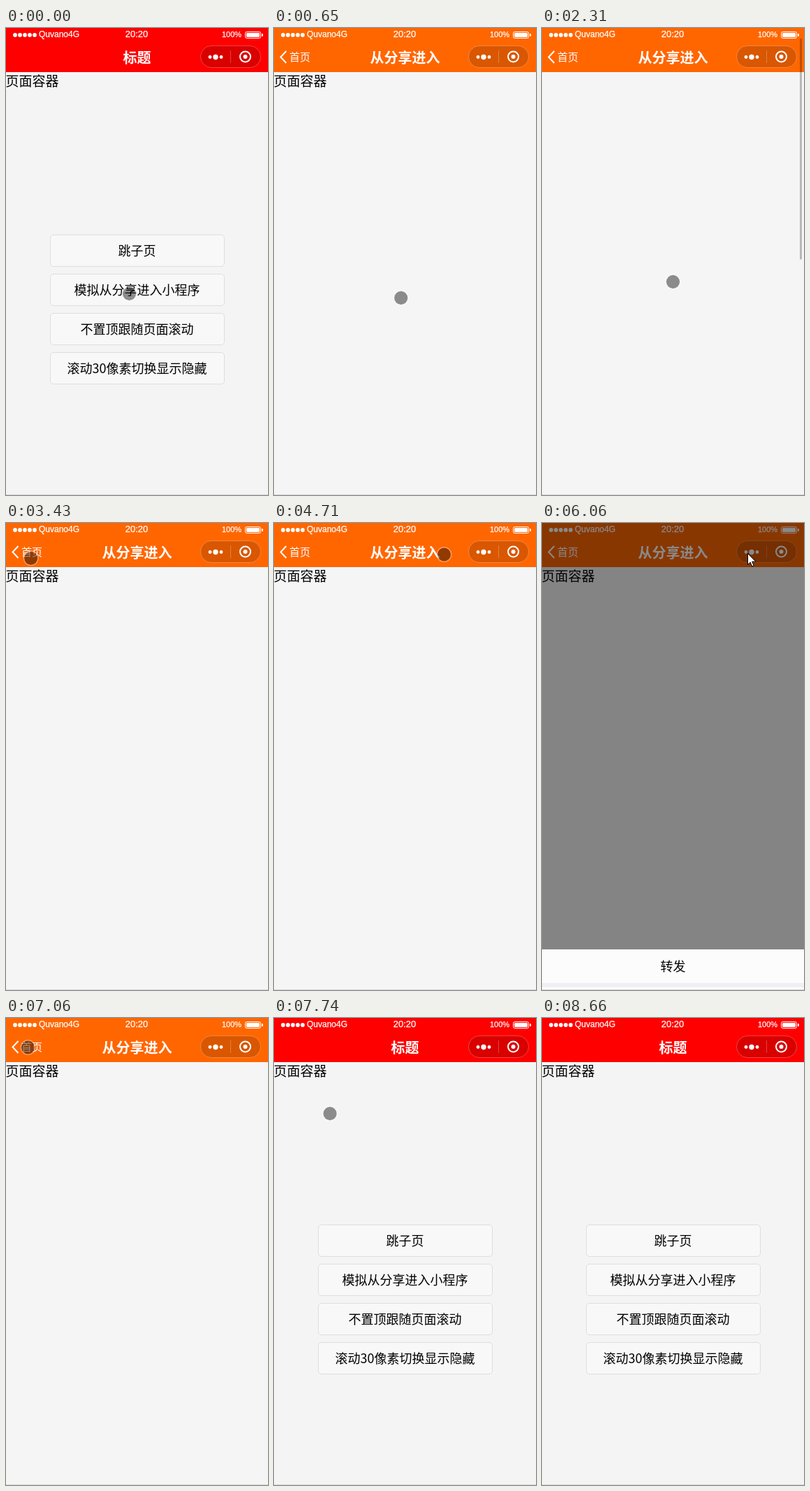
Write an HTML page that moves like this. It is 375 by 667 pixels and loops after 9710 ms.

```html
<!DOCTYPE html>
<html lang="zh-CN">
<head>
<meta charset="utf-8">
<title>导航栏演示</title>
<style>
  html, body { margin: 0; width: 100%; height: 100%; overflow: hidden; background: #f4f4f4; }
  svg { display: block; width: 375px; height: 667px; }
  text { font-family: "Noto Sans CJK SC", "Noto Sans CJK", sans-serif; font-size: 18px; font-weight: 350; }
  .mid { text-anchor: middle; }
  .title { font-size: 20px; font-weight: 700; fill: #fff; }
  .label { font-size: 19px; }
  .status text { font-family: "Liberation Sans", Arial, sans-serif; font-weight: 400; stroke: #fff; stroke-width: .25; }
  .button rect { fill: #f8f8f8; stroke: #dedede; }
</style>
</head>
<body>
<svg viewBox="0 0 375 667">
  <rect id="bg" width="375" height="667"/>
  <text id="label" class="label" x="-.5" y="83">页面容器</text>
  <g id="buttons"></g>

  <rect id="bar" width="375" height="63"/>
  <g class="status" fill="#fff">
    <path d="M13 10h28.1" stroke="#fff" stroke-width="5.8" stroke-linecap="round" stroke-dasharray="0 7"/>
    <text x="47" y="13" style="font-size:12px">Quvano4G</text>
    <text x="187" y="13" class="mid" style="font-size:13px">20:20</text>
    <text x="309" y="13" style="font-size:11px">100%</text>
    <rect x="342.5" y="5.5" width="22" height="9" rx="2" fill="none" stroke="#fff"/>
    <rect x="344" y="7" width="19" height="6" rx="1"/>
    <path d="M366 8h1q1 0 1 2t-1 2h-1z"/>
  </g>
  <text id="title" class="mid title" x="187.5" y="50"></text>
  <g id="home">
    <path d="M17.5 33L9.5 41.5L17.5 50" fill="none" stroke="#fff" stroke-width="2"/>
    <text x="22" y="47" fill="#fff" style="font-size:15px">首页</text>
  </g>
  <g fill="#fff">
    <rect x="278.5" y="25.5" width="86" height="31" rx="15.5" fill="#000" fill-opacity=".15" stroke="#fff" stroke-opacity=".25"/>
    <path d="M321.5 32v18" stroke="#fff" stroke-opacity=".25"/>
    <circle cx="292" cy="41.5" r="2.4"/>
    <circle cx="300" cy="41.5" r="3.7"/>
    <circle cx="308" cy="41.5" r="2.4"/>
    <circle cx="342.5" cy="41" r="7.5" fill="none" stroke="#fff" stroke-width="2"/>
    <circle cx="342.5" cy="41" r="3"/>
  </g>

  <rect id="thumb" x="369" width="3" height="316" rx="1.5" fill-opacity=".25"/>
  <rect id="mask" width="375" height="667"/>
  <g id="sheet">
    <rect y="566" width="375" height="102" fill="#efeff4"/>
    <rect y="566" width="375" height="48" fill="#fcfcfc"/>
    <rect y="620" width="375" height="48" fill="#fcfcfc"/>
    <text class="mid" x="187.5" y="597">转发</text>
    <text class="mid" x="187.5" y="651">取消</text>
  </g>
  <path d="M0 666.5h375" stroke="#dadada"/>

  <g id="touch">
    <circle r="9.7" fill-opacity=".43"/>
    <circle r="10.2" fill="none" stroke="#fff" stroke-opacity=".35" stroke-width="1.6"/>
  </g>
  <path id="arrow" d="M0 0V16L3.7 12.6L6.2 18.6L8.7 17.5L6.2 11.7H11.4Z" fill="#fff" stroke="#000"/>
</svg>
<script>
const LOOP = 9710;
const STEP = 134; // the screen updates in steps of this many ms
const SHARE_OPEN = 510, SHARE_CLOSE = 7740;
const SCROLL = 2310, SCROLL_BACK = 2440, THUMB_FADE = 2860;
const SHEET_OPEN = 5500, SHEET_CLOSE = 6060, SHEET_GONE = 6200;
const POINTER_GONE = 8660;

const el = id => document.getElementById(id);
const show = (id, on) => { el(id).style.display = on ? '' : 'none'; };
const place = (id, x, y) => el(id).setAttribute('transform', `translate(${x} ${y})`);

// Progress from 0 to 1 in equal steps, the first one taken at the start time.
const stepped = (t, start, steps) =>
  Math.min(steps, Math.max(0, Math.floor((t - start) / STEP) + 1)) / steps;

function pointerAt(t) {
  let x = 176.5, y = 379.5;
  const move = (start, steps, toX, toY) => {
    const k = stepped(t, start, steps);
    x += (toX - x) * k;
    y += (toY - y) * k;
  };
  move(250, 8, 190.5, 395.5);
  move(1750, 2, 187.5, 362.5);
  move(SCROLL_BACK, 3, 190, 397);
  move(THUMB_FADE, 4, 38, 52);
  move(3430, 3, 31, 47);
  move(4440, 3, 243.5, 45);
  move(4840, 2, 296, 55);
  move(5110, 3, 294.5, 43.5);
  move(SHEET_GONE, 5, 25, 54);
  move(7060, 1, 31.5, 42);
  move(7490, 8, 226, 420);
  move(8540, 1, 338, 656);
  return [x, y];
}

function draw(t) {
  const share = t >= SHARE_OPEN && t < SHARE_CLOSE;
  el('bg').setAttribute('fill', share ? '#f5f5f5' : '#f4f4f4');
  el('bar').setAttribute('fill', share ? '#f60' : '#f00');
  el('title').textContent = share ? '从分享进入' : '标题';
  show('home', share);
  show('buttons', !share);

  const scroll = t < SCROLL ? 0 : 27 * (1 - stepped(t, SCROLL_BACK, 3));
  place('label', 0, -scroll);
  place('thumb', 0, 2 + scroll * .475);
  el('thumb').style.opacity = t < SCROLL ? 0 : 1 - stepped(t, THUMB_FADE, 3);

  const sheet = t >= SHEET_OPEN && t < SHEET_GONE;
  const closing = stepped(t, SHEET_CLOSE, 2);
  show('sheet', sheet);
  show('mask', sheet);
  place('sheet', 0, Math.round(101 * closing ** 1.23));
  el('mask').style.opacity = .515 * (1 - closing ** 3.3);

  const [x, y] = pointerAt(t);
  place('touch', x, y);
  place('arrow', x, y);
  show('arrow', sheet);
  show('touch', !sheet && t < POINTER_GONE);
}

el('buttons').innerHTML = ['跳子页', '模拟从分享进入小程序', '不置顶跟随页面滚动', '滚动30像素切换显示隐藏']
  .map((name, i) => `<g class="button" transform="translate(63 ${295 + i * 56})">
    <rect x=".5" y=".5" width="249" height="45" rx="4.5"/>
    <text class="mid" x="124.5" y="30">${name}</text></g>`).join('');

function tick(now) {
  draw(now % LOOP);
  requestAnimationFrame(tick);
}
draw(0);
requestAnimationFrame(tick);
</script>
</body>
</html>
```
